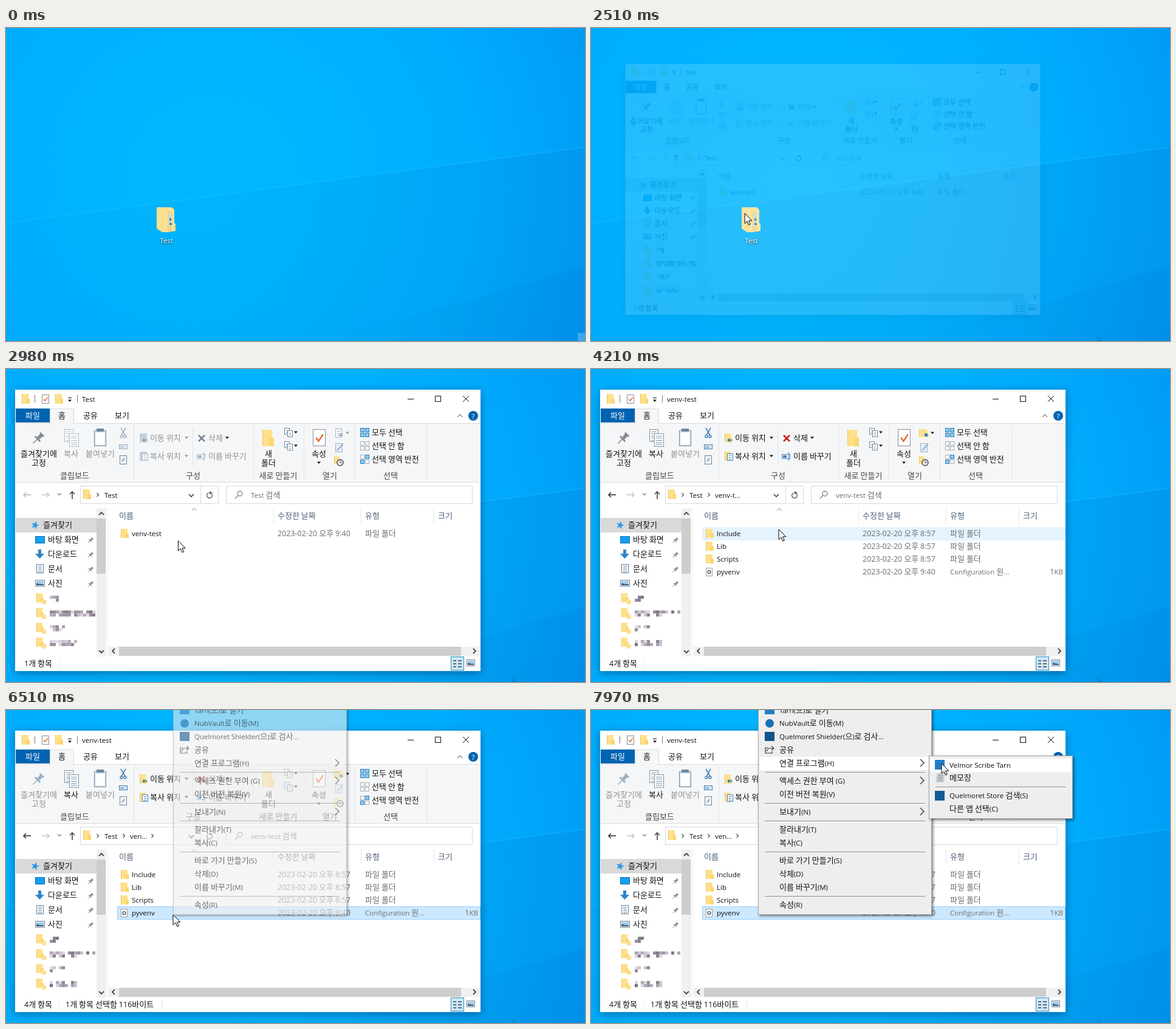
Recreate the animation shown at these times as an HTML page with a canvas. Size 953 px wide and 515 px high, loop 8 s.

```html
<!DOCTYPE html>
<html lang="ko">
<head>
<meta charset="utf-8">
<title>venv-test</title>
<style>
  html, body { margin: 0; width: 100%; height: 100%; overflow: hidden; }
  canvas { display: block; }
</style>
</head>
<body>
<canvas id="stage" width="953" height="515"></canvas>
<script>
const W = 953, H = 515, LOOP = 8000;
const screen2d = document.getElementById('stage').getContext('2d');
const layer = Object.assign(document.createElement('canvas'), { width: W, height: H });
const layer2d = layer.getContext('2d');
let c = screen2d;

// Pointer path: time, x, y
const PATH = [
  [860, 833, 506], [930, 693, 460], [1000, 578, 412], [1070, 522, 392], [1140, 472, 370],
  [1420, 243, 277], [1630, 195, 249], [1700, 195, 249], [2190, 253, 305], [2650, 253, 305],
  [3260, 309, 264], [4480, 309, 264], [4830, 313, 341], [5830, 313, 341], [6370, 275, 337],
  [6780, 275, 337], [7200, 393, 171], [7550, 377, 88], [7620, 377, 88], [7970, 577, 88]
];
const TRAIL = [.14, .05, .36, .05, .1];
const GREY = '#6d6d6d', OFF = '#909090', INK = '#111', BLUE = '#0063b1', STEEL = '#6f87a0';

// ---- drawing helpers ----
function rect(x, y, w, h, fill, stroke) {
  if (fill) { c.fillStyle = fill; c.fillRect(x, y, w, h); }
  if (stroke) { c.strokeStyle = stroke; c.lineWidth = 1; c.strokeRect(x + .5, y + .5, w - 1, h - 1); }
}
// Shadow around a box only, so that translucent boxes stay clean inside
function dropShadow(x, y, w, h, color, blur, dx, dy) {
  c.save();
  c.beginPath();
  c.rect(0, 0, W, H);
  c.rect(x, y, w, h);
  c.clip('evenodd');
  Object.assign(c, { shadowColor: color, shadowBlur: blur, shadowOffsetX: dx, shadowOffsetY: dy });
  rect(x, y, w, h, '#000');
  c.restore();
}
function trace(points) {
  c.beginPath();
  for (let i = 0; i < points.length; i += 2) c.lineTo(points[i], points[i + 1]);
}
function line(points, color, width = 1) {
  trace(points);
  c.strokeStyle = color;
  c.lineWidth = width;
  c.stroke();
}
function poly(points, fill) {
  trace(points);
  c.closePath();
  c.fillStyle = fill;
  c.fill();
}
function circle(x, y, r, fill, stroke, from = 0, to = 7) {
  c.beginPath();
  c.arc(x, y, r, from, to);
  if (fill) { c.fillStyle = fill; c.fill(); }
  if (stroke) { c.strokeStyle = stroke; c.lineWidth = 1.4; c.stroke(); }
}
function fontFor(run) {
  if (/[가-힣]/.test(run)) return '13px "Noto Sans CJK KR", "Noto Sans CJK", sans-serif';
  return (/\d/.test(run) ? 12.5 : 11.5) + 'px "Open Sans", sans-serif';
}
// y is the visual middle; align: 0 left, .5 centre, 1 right
function text(string, x, y, color = INK, align = 0) {
  const runs = string.match(/[가-힣]+|[\d:.-]+|[^가-힣\d:.-]+/g).map(run => {
    c.font = fontFor(run);
    return [run, c.font, c.measureText(run).width];
  });
  x -= align * runs.reduce((sum, run) => sum + run[2], 0);
  c.fillStyle = color;
  for (const [run, font, width] of runs) {
    c.font = font;
    c.fillText(run, x, y + 4.5);
    x += width;
  }
}
const label = (string, x, y, color) => text(string, x, y, color, .5);
const triangle = (x, y, color = INK) => poly([x - 3, y - 1.5, x + 3, y - 1.5, x, y + 2], color);
// Chevron pointing along (dx, dy)
function chevron(x, y, dx, dy, size, color, width = 1.3) {
  const bx = x - dx * size / 2, by = y - dy * size / 2;
  line([bx - dy * size, by - dx * size, x + dx * size / 2, y + dy * size / 2, bx + dy * size, by + dx * size], color, width);
}
function arrow(x, y, dx, dy, color) {
  line([x - dx * 6, y - dy * 6, x + dx * 6, y + dy * 6], color, 1.6);
  chevron(x + dx * 4, y + dy * 4, dx, dy, 4, color, 1.6);
}
function folder(x, y, w = 13, h = 16) {
  rect(x, y, w * .85, h, '#ffe08a');
  rect(x + w * .6, y + h * .5, w * .4, h * .5, '#fbd56e');
  rect(x, y, 1, h, '#edc65f');
}
function sheet(x, y, w, h, stroke, rows = 3) {
  rect(x, y, w, h, '#fff', stroke);
  for (let i = 1; i <= rows; i++) rect(x + 3, Math.round(y + h * i / (rows + 1)), w - 6, 1, stroke);
}
function pin(x, y, size, color) {
  c.save();
  c.translate(x, y);
  c.rotate(Math.PI / 4);
  c.scale(size, size);
  rect(-4, -9, 8, 2.5, color);
  rect(-2.5, -7, 5, 7, color);
  rect(-5.5, 0, 11, 2.5, color);
  rect(-.7, 2, 1.4, 9, color);
  c.restore();
}
function tick(x, y, w, h) {
  rect(x, y, w, h, '#fff', '#8a8f96');
  line([x + w * .25, y + h * .5, x + w * .45, y + h * .7, x + w * .8, y + h * .3], '#e0662b', w / 9);
}
function star(x, y, r) {
  const points = [];
  for (let i = 0; i < 10; i++) {
    const a = i * Math.PI / 5 - 1.3, d = i % 2 ? r * .42 : r;
    points.push(x + d * Math.cos(a), y + d * Math.sin(a));
  }
  poly(points, '#2b9be6');
}
const noise = n => { const v = Math.sin(n * 12.9898) * 43758.5453; return v - Math.floor(v); };
function mosaic(x, y, w, seed) {
  for (let i = 0; i < w / 5 * 2; i++) {
    const n = noise(seed + i), shade = 110 + 110 * noise(seed + i + 50);
    if (n > .25) rect(x + (i >> 1) * 5, y + (i % 2) * 5, 5, 5, `rgb(${shade + 10},${shade},${shade + 14})`);
  }
}
function pointer(x, y, fill, stroke) {
  const shape = [0, 0, 0, 16.5, 4, 13, 6.7, 19, 9.2, 18, 6.6, 12, 11.8, 12].map((v, i) => v + (i % 2 ? y : x));
  poly(shape, fill);
  if (stroke) line([...shape, x, y], stroke);
}

// ---- scene ----
function gradient(g, ...stops) {
  stops.forEach((color, i) => g.addColorStop(i / (stops.length - 1), color));
  return g;
}
function wallpaper() {
  rect(0, 0, W, H, gradient(c.createRadialGradient(340, 250, 0, 340, 250, 680), '#00b9ff', '#00b4ff', '#00abfd', '#009af4'));
  const shade = (to, x0 = 0) => gradient(c.createLinearGradient(x0, 0, W, 0), 'rgba(0,90,150,.02)', to);
  poly([0, 322, 290, 284, 560, 248, W, 197, W, H, 0, H], shade('rgba(0,90,170,.1)'));
  poly([560, 502, 760, 448, W, 392, W, H, 560, H], shade('rgba(0,80,160,.08)', 560));
  line([0, 321, 290, 283, 560, 247, W, 196], 'rgba(50,200,255,.2)', 2);
}
function desktopIcon(t, x, y) {
  const over = x > 226 && x < 302 && y > 290 && y < 358;
  if (over && t < 2510) rect(226, 290, 76, 68, 'rgba(255,255,255,.2)', 'rgba(255,255,255,.3)');
  poly([248, 295, 273, 295, 277, 299, 277, 321, 279, 322, 279, 334, 266, 336, 257, 336, 248, 330], '#fae093');
  poly([266, 299, 273, 305, 273, 335, 266, 335], '#f2d484');
  rect(268, 304, 5, 22, '#c9dfd0');
  rect(269, 313, 3, 4, '#2f7fb5');
  rect(269, 321, 4, 3, '#2f7fb5');
  line([257, 304, 257, 335], '#efcd78');
  c.save();
  Object.assign(c, { shadowColor: '#000', shadowBlur: 3, shadowOffsetY: 1 });
  label('Test', 264, 349, '#fff');
  c.restore();
}

function titleBar(title) {
  folder(26, 41);
  tick(59, 42, 12, 15);
  folder(81, 41);
  rect(47, 43, 1, 12, '#777');
  rect(102, 47, 6, 1, INK);
  triangle(105, 52);
  rect(117, 43, 1, 12, '#777');
  text(title, 125, 49);
  rect(661, 49, 10, 1, INK);
  rect(706, 44, 10, 10, null, INK);
  line([752, 44, 762, 54], INK);
  line([762, 44, 752, 54], INK);
}
function ribbon(active, canPin) {
  const ink = active ? INK : OFF, tone = active ? '#3e7fb8' : '#9fb2c6';
  rect(16, 89, 764, 98, '#f5f6f7');
  rect(16, 89, 764, 1, '#dadbdc');
  rect(16, 186, 764, 1, '#dadbdc');
  rect(16, 65, 56, 23, BLUE);
  label('파일', 44, 76, '#fff');
  rect(72, 65, 40, 26, '#f5f6f7', '#dadbdc');
  rect(73, 89, 38, 3, '#f5f6f7');
  label('홈', 92, 76);
  label('공유', 139, 76);
  label('보기', 191, 76);
  chevron(747, 77, 0, -1, 4, '#888');
  circle(769, 77, 8, BLUE);
  label('?', 769, 77, '#fff');
  for (const x of [211, 408, 491, 575, 693]) rect(x - 1, 93, 1, 91, '#e2e3e4');
  rect(307, 99, 1, 58, '#e2e3e4');
  [['클립보드', 113], ['구성', 308], ['새로 만들기', 448], ['열기', 533], ['선택', 633]]
    .forEach(([name, x]) => label(name, x, 175, '#444'));

  pin(53, 114, 1.1, canPin ? '#85898f' : '#9cafc4');
  label('즐겨찾기에', 54, 139, canPin ? INK : OFF);
  label('고정', 54, 154, canPin ? INK : OFF);
  sheet(96, 99, 15, 21, active ? '#8a8f96' : '#a8b9ca', 5);
  sheet(104, 106, 16, 22, active ? '#7895b0' : '#a8b9ca', 5);
  label('복사', 107, 139, ink);
  rect(145, 101, 20, 26, '#dfe7ef', STEEL);
  rect(149, 98, 12, 5, STEEL);
  rect(148, 105, 14, 19, '#fff');
  label('붙여넣기', 155, 139, OFF);
  line([189, 97, 196, 109], tone, 1.5);
  line([197, 97, 190, 109], tone, 1.5);
  circle(190, 111, 2, null, tone);
  circle(196, 111, 2, null, tone);
  rect(186, 124, 14, 8, '#dce6ee', tone);
  line([188, 127, 190, 130, 192, 127, 194, 130], tone);
  rect(187, 142, 12, 15, '#edf2f7', STEEL);
  line([191, 152, 195, 147], STEEL, 1.5);

  [['이동 위치', 113], ['복사 위치', 143]].forEach(([name, y], i) => {
    if (active) folder(220, y - 7, 12, 15); else rect(220, y - 7, 12, 15, '#c3d0dc');
    if (i) sheet(224, y - 4, 10, 12, tone);
    else arrow(229, y + 4, -.6, 0, active ? '#1b78c2' : '#8297ac');
    text(name, 237, y, ink);
    triangle(297, y, ink);
  });
  const cross = active ? '#c81e1e' : '#71859a';
  line([317, 109, 327, 119], cross, 2.5);
  line([327, 109, 317, 119], cross, 2.5);
  text('삭제', 333, 113, ink);
  triangle(364, 113);
  rect(314, 140, 14, 8, '#fff', tone);
  rect(316, 142, 6, 4, tone);
  line([325.5, 137, 325.5, 151], tone);
  text('이름 바꾸기', 333, 143, ink);

  folder(422, 100, 19, 27);
  label('새', 432, 139);
  label('폴더', 432, 154);
  for (const y of [97, 119]) {
    sheet(458, y, 9, 11, STEEL, 2);
    sheet(463, y + 4, 9, 11, STEEL, 2);
    triangle(477, y + 7);
  }
  tick(505, 99, 21, 28);
  label('속성', 515, 139);
  triangle(515, 154);
  if (active) folder(540, 99, 16, 13); else sheet(542, 98, 11, 15, '#9fb2c6');
  rect(549, 106, 5, 5, tone);
  triangle(562, 105, ink);
  rect(542, 122, 12, 15, '#e8eef4', '#9fb2c6');
  line([545, 134, 555, 123], '#8fb0cf', 2);
  folder(540, 144, 10, 12);
  circle(550, 154, 5, '#eee', '#444');
  line([550, 151, 550, 154, 553, 154], '#444');

  ['모두 선택', '선택 안 함', '선택 영역 반전'].forEach((name, row) => {
    const y = 104 + row * 22;
    for (let i = 0; i < 4; i++) {
      const on = row === 0 || (row === 2 && (i === 1 || i === 2));
      rect(583 + (i % 2) * 8, y - 7 + (i >> 1) * 8, 7, 7, on ? '#8ccaf2' : '#fff', on ? '#2b7fb9' : '#a5acb3');
    }
    text(name, 602, y);
  });
}
function addressBar(path, query, canGoBack) {
  arrow(35, 207, -1, 0, canGoBack ? '#333' : '#bbb');
  arrow(65, 207, 1, 0, '#c8c8c8');
  chevron(88, 206, 0, 1, 3, '#888');
  arrow(109, 208, 0, -1, '#444');
  rect(122, 192, 228, 30, '#fff', '#d9d9d9');
  rect(320, 193, 1, 28, '#d9d9d9');
  folder(127, 198);
  chevron(151, 207, 1, 0, 3, '#555');
  path.forEach((part, i) => {
    const x = [162, 204, 241][i];
    if (i) chevron(i === 1 ? 194 : 241, 207, 1, 0, 3, '#555');
    if (part) text(part, x, 207);
  });
  chevron(305, 208, 0, 1, 4, '#444', 1.6);
  circle(335, 208, 4.3, null, '#555', -.7, 4.4);
  poly([335, 201, 340, 204, 335, 206], '#555');
  rect(362, 192, 406, 30, '#fff', '#d9d9d9');
  circle(385, 205, 4, null, '#888');
  line([382, 208, 377, 213], '#888', 1.4);
  text(query + ' 검색', 403, 207, GREY);
}
function sidebar(seed) {
  rect(16, 245, 133, 24, '#d9d9d9');
  star(48, 257, 7);
  text('즐겨찾기', 61, 256);
  ['바탕 화면', '다운로드', '문서', '사진'].forEach((name, i) => {
    const y = 280 + i * 24;
    if (i === 0) rect(48, y - 5, 16, 12, '#12a0f0', '#0b6db5');
    if (i === 1) {
      rect(53, y - 7, 5, 8, '#2f86c8');
      poly([48, y, 63, y, 55.5, y + 8], '#2f86c8');
    }
    if (i === 2) sheet(50, y - 7, 12, 15, '#5f7f9c', 4);
    if (i === 3) picture(48, y - 5, 16);
    text(name, 69, y);
    pin(139, y + 2, .55, '#7d858d');
  });
  [15, 75, 25, 45].forEach((w, i) => {
    const y = 377 + i * 24.3;
    folder(50, y - 8, 12, 15);
    rect(59, y + 3, 7, 7, '#fbdf92');
    mosaic(72, y - 4, w, seed + i * 31);
  });
  rect(149, 229, 16, 244, '#f0f0f0');
  rect(149, 246, 15, 91, '#cdcdcd');
  chevron(157, 238, 0, -1, 4, '#444', 1.8);
  chevron(157, 465, 0, 1, 4, '#444', 1.8);
  rect(167, 229, 1, 244, '#f0f0f0');
}
function picture(x, y, w) {
  rect(x, y, w, 11, '#fff', '#6f7f8f');
  rect(x + 2, y + 2, w - 4, 7, '#9cc9ea');
  poly([x + 2, y + 9, x + 2, y + 5, x + 7, y + 7, x + w - 2, y + 7, x + w - 2, y + 9], '#33597c');
}
function fileList(rows, selected, hovered) {
  chevron(310, 231, 0, -1, 4, '#888', 1);
  [['이름', 186], ['수정한 날짜', 447], ['유형', 591], ['크기', 711]].forEach(([name, x], i) => {
    text(name, x, 241, '#4c607a');
    if (i) rect(x - 7, 229, 1, 25, '#e5e5e5');
  });
  rows.forEach(([name, time, type, size], i) => {
    const y = 260 + i * 21;
    if (i === selected) rect(183, y, 598, 22, '#cce8ff', '#99d1ff');
    else if (i === hovered) rect(183, y, 598, 22, '#e5f3ff');
    if (size) {
      rect(189, y + 4, 11, 14, '#fff', '#a0a0a0');
      circle(194.5, y + 11, 2.4, null, '#555');
    } else folder(189, y + 3, 13, 15);
    text(name, 207, y + 10.5);
    text('2023-02-20 오후 ' + time, 447, y + 10.5, GREY);
    text(type, 591, y + 10.5, GREY);
    if (size) text(size, 777, y + 10.5, GREY, 1);
  });
  rect(169, 457, 611, 15, '#f0f0f0');
  rect(186, 457, 563, 15, '#cdcdcd');
  chevron(177, 464, -1, 0, 4, '#444', 1.8);
  chevron(771, 464, 1, 0, 4, '#444', 1.8);
}
function statusBar(count, detail) {
  text(count + '개 항목', 30, 484);
  rect(87, 477, 1, 14, '#eee');
  if (detail) {
    text(detail, 98, 484);
    rect(256, 477, 1, 14, '#e5e5e5');
  }
  rect(732, 473, 22, 23, '#cce8f6', '#2a92c4');
  for (let i = 0; i < 3; i++) {
    for (const x of [736, 744]) rect(x, 479 + i * 5, x === 736 ? 5 : 6, 2, '#667');
  }
  picture(758, 478, 14);
}
function explorer(t, y, menuOpen) {
  const inside = t >= 4070;
  const rows = inside
    ? [...['Include', 'Lib', 'Scripts'].map(name => [name, '8:57', '파일 폴더']), ['pyvenv', '9:40', 'Configuration 원...', '1KB']]
    : [['venv-test', '9:40', '파일 폴더']];
  const selected = inside ? (t >= 5360 ? 3 : -1) : (t >= 3930 ? 0 : -1);
  const hovered = menuOpen ? -1 : Math.floor((y - 260) / 21);
  const path = inside ? (t < 4480 ? ['Test', 'venv-t...'] : ['Test', 'ven...', '']) : ['Test'];
  const title = inside ? 'venv-test' : 'Test';
  const detail = inside ? (t >= 5760 && '1개 항목 선택함 116바이트') : (t >= 3930 && '1개 항목 선택함');
  rect(15, 34, 766, 463, '#fff');
  titleBar(title);
  ribbon((t >= 3930 && t < 4280) || t >= 5830, t < 5830);
  addressBar(path, title, inside);
  sidebar(inside ? 7 : 190);
  fileList(rows, selected, hovered);
  statusBar(rows.length, detail);
}

const MENU = [
  ['Tarn(으)로 열기', 0], ['NubVault로 이동(M)', 21], ['Quelmoret Shielder(으)로 검사...', 43], ['공유', 65],
  ['연결 프로그램(H)', 87, true], [null, 102], ['액세스 권한 부여 (G)', 116, true], ['이전 버전 복원(V)', 138],
  [null, 153], ['보내기(N)', 167, true], [null, 182], ['잘라내기(T)', 196], ['복사(C)', 218], [null, 233],
  ['바로 가기 만들기(S)', 247], ['삭제(D)', 269], ['이름 바꾸기(M)', 291], [null, 306], ['속성(R)', 320]
];
const SUBMENU = [['Velmor Scribe Tarn', 90], ['메모장', 111], [null, 126], ['Quelmoret Store 검색(S)', 140], ['다른 앱 선택(C)', 162]];

function menu(items, left, top, width, height, textX, hoverY) {
  dropShadow(left, top, width, height, 'rgba(0,0,0,.5)', 4, 2, 2);
  rect(left, top, width, height, '#eee', '#a5a5a5');
  for (const [name, y, nested] of items) {
    if (!name) { rect(left + 11, y, width - 22, 1, '#919191'); continue; }
    if (Math.abs(hoverY - y) < 11) rect(left + 3, y - 10, width - 6, 22, '#fff');
    text(name, textX, y);
    if (nested) chevron(left + 270, y, 1, 0, 6, '#333');
  }
}
function contextMenu(hoverY) {
  menu(MENU, 275, -20, 286, 357, 310, hoverY);
  rect(286, -8, 16, 15, '#1f7fc4');
  circle(294, 22, 7, '#1d6fb4');
  rect(286, 36, 16, 15, '#11558c');
  line([291, 62, 287, 62, 287, 71, 298, 71, 298, 68], '#333', 1.2);
  line([289, 68, 292, 63, 300, 63], '#333', 1.2);
  chevron(299, 63, 1, 0, 3.5, '#333');
}
function submenu(hoverY) {
  menu(SUBMENU, 556, 75, 237, 104, 590, hoverY);
  rect(566, 82, 16, 16, '#1f7fc4');
  poly([570, 104, 583, 104, 580, 119, 567, 119], '#c9ced2');
  for (let i = 0; i < 4; i++) rect(571, 107 + i * 3, 8, 1, '#8c959c');
  rect(566, 133, 16, 16, '#155a94');
}

function pointerAt(t) {
  const next = PATH.findIndex(key => key[0] > t);
  if (next < 0) return PATH[PATH.length - 1].slice(1);
  if (next === 0) return [-50, -50];
  const [t0, x0, y0] = PATH[next - 1], [t1, x1, y1] = PATH[next];
  const p = (t - t0) / (t1 - t0);
  return [x0 + (x1 - x0) * p, y0 + (y1 - y0) * p];
}

function draw(now) {
  const t = now % LOOP, [x, y] = pointerAt(t);
  const menuOpen = t >= 6510, submenuOpen = t >= 7690;
  c = screen2d;
  wallpaper();
  desktopIcon(t, x, y);
  if (t < 70) rect(941, 502, 12, 13, 'rgba(255,255,255,.24)');
  // The opening window wipes the trail, except below its bottom edge
  TRAIL.forEach((alpha, i) => {
    const [, px, py] = PATH[i];
    if (t >= PATH[i + 1][0] && (t < 2510 || py > 500)) pointer(px, py, `rgba(40,60,70,${alpha})`);
  });
  if (t >= 2510) {
    c = layer2d;
    c.clearRect(0, 0, W, H);
    explorer(t, y, menuOpen);
    c = screen2d;
    const p = Math.min(1, (t - 2480) / 300), scale = 1 - .15 * (1 - p) ** 3;
    c.save();
    c.translate(398, 265.5);
    c.scale(scale, scale);
    c.translate(-398, -265.5);
    c.globalAlpha = Math.min(1, p * 1.4);
    dropShadow(15, 34, 766, 463, 'rgba(0,30,70,.45)', 14, 0, 3);
    c.drawImage(layer, 0, 0);
    c.restore();
  }
  if (menuOpen) {
    c.save();
    c.globalAlpha = t < 6580 ? .6 : 1;
    contextMenu(submenuOpen ? 87 : y < 337 ? y : -99);
    c.restore();
  }
  if (submenuOpen) submenu(x > 556 ? y : -99);
  pointer(x, y, '#fff', '#000');
}

function animate() {
  draw(performance.now());
  requestAnimationFrame(animate);
}
animate();
</script>
</body>
</html>
```
